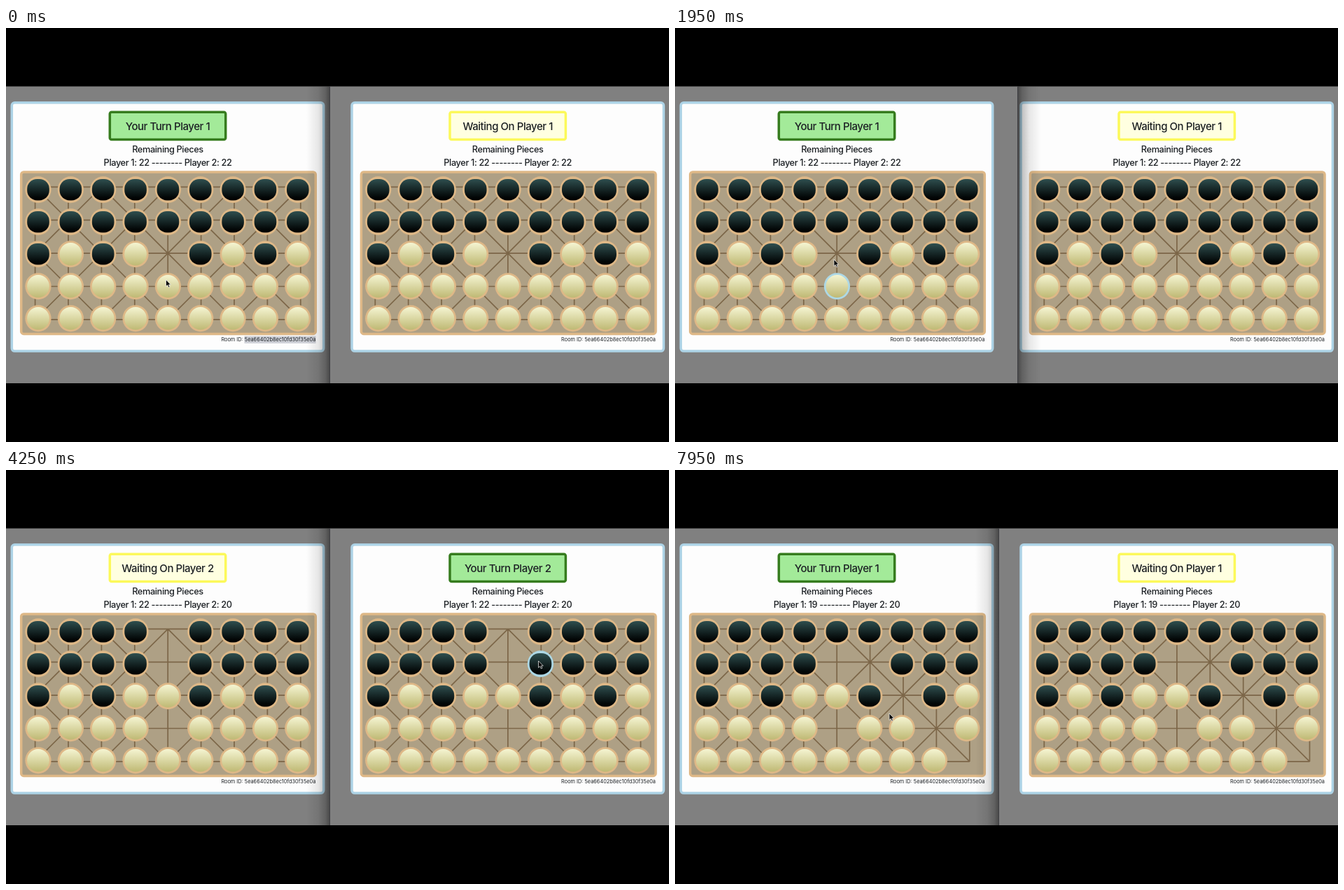
An HTML page for the animation above (8000 ms loop, 947 by 592 pixels).

```html
<!DOCTYPE html>
<html lang="en">
<head>
<meta charset="utf-8">
<title>Two player board</title>
<style>
  html, body { margin: 0; width: 100%; height: 100%; overflow: hidden; background: #000; }
  svg { display: block; width: 100vw; height: 100vh; }
  text { font-family: Inter, "Liberation Sans", sans-serif; fill: #1c2024; }
  .banner { font-size: 15px; font-weight: 500; letter-spacing: -.03em; text-anchor: middle; }
  .info { font-size: 12.75px; font-weight: 500; letter-spacing: -.03em; text-anchor: middle; }
  .room { font-size: 7.35px; text-anchor: end; }
</style>
</head>
<body>
<svg viewBox="0 0 947 592">
  <defs>
    <linearGradient id="dark" x2="0" y2="1">
      <stop stop-color="#2f4f4f"/><stop offset=".85" stop-color="#030707"/><stop offset="1"/>
    </linearGradient>
    <linearGradient id="light" x2="0" y2="1">
      <stop stop-color="#f5f5d2"/><stop offset="1" stop-color="#bfb974"/>
    </linearGradient>
    <linearGradient id="shade">
      <stop stop-opacity="0"/><stop offset=".5" stop-opacity=".09"/>
      <stop offset=".8" stop-opacity=".24"/><stop offset="1" stop-opacity=".45"/>
    </linearGradient>
  </defs>
  <rect width="947" height="592"/>
  <rect y="83.5" width="947" height="424.5" fill="#808080"/>
  <g id="left"></g>
  <g id="right" transform="translate(485.7)"></g>
  <g id="edge">
    <rect x="-34" y="83.5" width="34" height="424.5" fill="url(#shade)"/>
    <rect x="-1" y="83.5" width="1" height="424.5" fill="#3e3e42"/>
  </g>
  <path id="cursor" d="M0 0V9.6L2.2 7.6L3.8 11L5.4 10.3L3.9 7H6.8Z" fill="#000" stroke="#fff" stroke-width=".7"/>
</svg>
<script>
const LOOP = 8000;
const $ = id => document.getElementById(id);

// One entry per position: rows of pieces, remaining counts, player to move.
const positions = [
  { rows: ['bbbbbbbbb', 'bbbbbbbbb', 'bwbw.bwbw', 'wwwwwwwww', 'wwwwwwwww'], left: [22, 22], turn: 1 },
  { rows: ['bbbb.bbbb', 'bbbb.bbbb', 'bwbwwbwbw', 'wwww.wwww', 'wwwwwwwww'], left: [22, 20], turn: 2 },
  { rows: ['bbbbbbbbb', 'bbbb..bbb', 'bwbwwb.bw', 'wwww.ww.w', 'wwwwwwww.'], left: [19, 20], turn: 1 }
];

const players = [
  { id: 'left', moves: [2350, 6350], pick: { from: 300, to: 2350, cell: '4,3' } },
  { id: 'right', moves: [2350, 6300], pick: { from: 3950, to: 6300, cell: '5,1' } }
];

// Span in which the left window is in front, and in which the room id is selected.
const leftFront = [250, 3800];

// time, x, y
const cursorPath = [
  [0, 228.5, 360], [1000, 228.5, 360], [1500, 227, 331], [1950, 227, 331], [2200, 230, 321],
  [2450, 230, 321], [2850, 642, 371], [3300, 642, 371], [3700, 760.5, 273], [4500, 760.5, 273],
  [5050, 722, 223], [5350, 719.5, 227.5], [6450, 719.5, 227.5], [7300, 306, 348], [LOOP, 306, 348]
];

const gridX = i => 41.6 + 47.4 * i;
const gridY = j => 227.3 + 47.4 * j;

function gridLines() {
  let d = '';
  const line = (a, b, c, e) => d += `M${gridX(a)} ${gridY(b)}L${gridX(c)} ${gridY(e)}`;
  for (let i = 0; i < 9; i++) line(i, 0, i, 4);
  for (let j = 0; j < 5; j++) line(0, j, 8, j);
  for (let i = 0; i < 8; i++) {
    for (let j = 0; j < 4; j++) {
      if ((i + j) % 2) line(i + 1, j, i, j + 1);
      else line(i, j, i + 1, j + 1);
    }
  }
  return `<path d="${d}" stroke="#7c6648" stroke-width="1.7" fill="none"/>`;
}

function piece(kind, i, j, picked) {
  const x = 46 + 46.35 * i, y = 231.2 + 46 * j;
  const ring = `<ellipse cx="${x}" cy="${y}" rx="18.6" ry="19" fill="${picked ? '#add8e6' : '#deb887'}"/>`;
  return ring + (kind === 'b'
    ? `<rect x="${x - 15.8}" y="${y - 15.3}" width="31.6" height="30.6" rx="14.2" fill="url(#dark)"/>`
    : `<ellipse cx="${x}" cy="${y}" rx="15.9" ry="16.3" fill="url(#light)"/>`);
}

function banner(mine, turn) {
  const [fill, stroke] = mine ? ['#a3ea99', '#367c1e'] : ['#ffffe0', '#fcf95a'];
  return `<rect x="148.3" y="120.2" width="165.4" height="39.2" rx="2.5" fill="${fill}" stroke="${stroke}" stroke-width="3.5"/>
    <text class="banner" x="231" y="146">${mine ? 'Your Turn' : 'Waiting On'} Player ${turn}</text>`;
}

const grid = gridLines();

function panel(seat, { rows, left, turn }, picked, marked) {
  const pieces = rows.map((row, j) => [...row].map((kind, i) =>
    kind === '.' ? '' : piece(kind, i, j, picked === `${i},${j}`)).join('')).join('');
  return `<rect x="8.3" y="106.7" width="445.4" height="355.4" rx="4" fill="#fdfdfd" stroke="#add3e6" stroke-width="3.5"/>
    ${banner(seat === turn, turn)}
    <text class="info" x="231" y="178.3">Remaining Pieces</text>
    <text class="info" x="231" y="197.3">Player 1: ${left[0]} -------- Player 2: ${left[1]}</text>
    <rect x="21.7" y="206" width="420.6" height="231.4" rx="3.5" fill="#aea085" stroke="#deb887" stroke-width="3.5"/>
    ${grid}${pieces}
    ${marked ? '<rect x="340.5" y="440.5" width="102" height="10.5" fill="#cfd1d8"/>' : ''}
    <text class="room" x="442.3" y="448">Room ID: 5ea66402b8ec10fd30f35e0a</text>`;
}

function cursorAt(t) {
  const n = cursorPath.findIndex(p => p[0] > t);
  const [t0, x0, y0] = cursorPath[n - 1], [t1, x1, y1] = cursorPath[n];
  const u = (t - t0) / (t1 - t0), k = u * u * (3 - 2 * u);
  return [x0 + (x1 - x0) * k, y0 + (y1 - y0) * k];
}

const shown = {};

function render(t) {
  players.forEach(({ id, moves, pick }, n) => {
    const step = moves.filter(m => t >= m).length;
    const picked = t >= pick.from && t < pick.to ? pick.cell : '';
    const marked = id === 'left' && t < leftFront[0];
    const key = [step, picked, marked].join('|');
    if (shown[id] === key) return;
    shown[id] = key;
    $(id).innerHTML = panel(n + 1, positions[step], picked, marked);
  });
  const inFront = t >= leftFront[0] && t < leftFront[1];
  $('edge').setAttribute('transform', inFront ? 'translate(489) scale(-1 1)' : 'translate(463)');
  $('cursor').setAttribute('transform', `translate(${cursorAt(t)})`);
}

const start = performance.now();
function tick() {
  render((performance.now() - start) % LOOP);
  requestAnimationFrame(tick);
}
tick();
</script>
</body>
</html>
```
